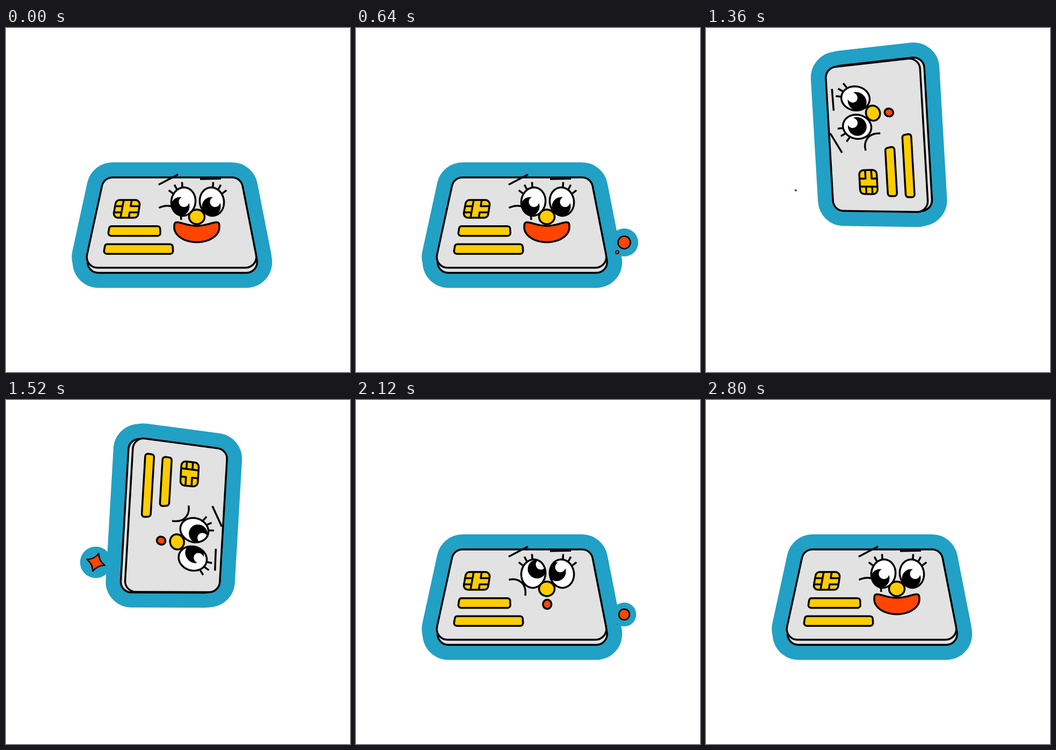
An HTML page with a canvas that plays this animation: 640 px wide and 640 px high, repeating every 2920 ms.

```html
<!DOCTYPE html>
<html lang="en">
<head>
<meta charset="utf-8">
<title>Jumping card</title>
<style>
html, body { margin: 0; width: 100%; height: 100%; overflow: hidden; background: #fff; }
canvas { display: block; width: 640px; height: 640px; }
</style>
</head>
<body>
<canvas id="stage" width="640" height="640"></canvas>
<script>
const g = document.getElementById('stage').getContext('2d');
const LOOP = 2920, STEP = 40, LAST = 2800, RAD = Math.PI / 180;
const BLUE = '#21a1c5', GREY = '#e2e2e2', YELLOW = '#ffcc00', RED = '#ff4500';

const mix = (a, b, p) => a + (b - a) * p;
const part = (t, a, b) => Math.min(1, Math.max(0, (t - a) / (b - a)));
const ease = (t, a, b) => { const p = part(t, a, b); return p * p * (3 - 2 * p); };
const pulse = (t, a, b, c) => ease(t, a, b) - ease(t, b, c);

// The lying card: a trapezoid around (CX, CY)
const CX = 308.6, CY = 362, TOP = 255, BOTTOM = 324.5, HEIGHT = 168;
let pose, anchor, shift = [0, 0];

function setPose(t) {
  const hop = pulse(t, 0, 240, 580);
  const p = part(t, 1160, 1680), leap = 4 * p * (1 - p);
  const turn = (-31.6 * hop - 360 * ease(t, 1200, 1680)) * RAD;
  const flat = Math.min(1, 1.2 * hop + 2 * leap);
  pose = {
    x: CX - 37 * hop + 9.4 * leap,
    y: CY - 48.7 * hop - 168 * leap,
    c: Math.cos(turn), s: Math.sin(turn), flat,
    top: mix(TOP, 266, flat), bottom: mix(BOTTOM, 288.5, flat), height: mix(HEIGHT, 176, flat),
    squash: 1.25 * pulse(t, 720, 1160, 1220) + 1.3 * pulse(t, 1620, 1680, 1890) - 1.5 * pulse(t, 2260, 2440, 2660),
    look: ease(t, 1140, 1580) - ease(t, 2220, 2580),
    smile: 1 - ease(t, 860, 1220) + ease(t, 2240, 2600)
  };
}

const spin = (X, Y) => [X * pose.c - Y * pose.s, X * pose.s + Y * pose.c];

// Perspective position of a point of the lying card, with its row's scale
function project(x, y) {
  const k0 = TOP / BOTTOM, v0 = (y - CY) / HEIGHT + .5, row = mix(TOP, BOTTOM, v0);
  const u = (x - CX - .9 + 1.8 * v0) / row, v = v0 / (k0 + (1 - k0) * v0);
  const k = pose.top / pose.bottom, w = v * k / (1 - (1 - k) * v);
  const width = mix(pose.top, pose.bottom, w);
  const [X, Y] = spin(u * width + .9 - 1.8 * w + shift[0], (w - .5) * pose.height + shift[1]);
  return { x: pose.x + X, y: pose.y + Y, u, scale: width / row };
}

// Parts keep their shape around an anchor and only lose their lean
function at(x, y) {
  if (!anchor) { const q = project(x, y); return [q.x, q.y]; }
  const q = project(...anchor), dx = x - anchor[0], dy = y - anchor[1];
  const [X, Y] = spin((dx - q.u * .4 * pose.flat * dy) * q.scale, dy * q.scale);
  return [q.x + X, q.y + Y];
}

function lines(...strokes) {
  const p = new Path2D();
  for (const s of strokes) s.forEach((q, i) => p[i ? 'lineTo' : 'moveTo'](...at(...q)));
  return p;
}

function ring(fn, n = 40) {
  const p = new Path2D();
  for (let i = 0; i < n; i++) {
    const a = i / n * 2 * Math.PI;
    p[i ? 'lineTo' : 'moveTo'](...at(...fn(Math.cos(a), Math.sin(a))));
  }
  p.closePath();
  return p;
}

const oval = (x, y, rx, ry = rx, tilt = 0) => ring((c, s) => [
  x + rx * c * Math.cos(tilt) - ry * s * Math.sin(tilt),
  y + rx * c * Math.sin(tilt) + ry * s * Math.cos(tilt)
]);

function roundQuad(corners, r) {
  const q = corners.map(c => at(...c)), p = new Path2D();
  p.moveTo((q[0][0] + q[3][0]) / 2, (q[0][1] + q[3][1]) / 2);
  q.forEach((c, i) => p.arcTo(...c, ...q[(i + 1) % 4], r));
  p.closePath();
  return p;
}

function paint(p, fill, line = 3.5) {
  if (fill) { g.fillStyle = fill; g.fill(p); }
  if (line) { g.strokeStyle = '#000'; g.lineWidth = line; g.stroke(p); }
}

const card = () => roundQuad([[182, 278], [437, 278], [470, 446], [145.5, 446]], 20);

function chip() {
  anchor = [225, 336.5];
  paint(roundQuad([[205, 320], [250, 320], [245, 353], [199, 353]], 8), YELLOW);
  paint(lines([[219, 320], [213, 353]],
    [[203, 331.5], [217, 331.5]], [[201, 343], [215, 343]],
    [[234, 320], [232, 331.5], [248, 331.5]], [[246.5, 343], [230, 343], [228.5, 353]]));
}

function bar(left, right, y) {
  anchor = [(left + right) / 2, y];
  paint(roundQuad([[left + 1.5, y - 9], [right - .5, y - 9], [right + .5, y + 9], [left - 1.5, y + 9]], 5), YELLOW);
}

function eye(x, side, px, py) {
  anchor = [x, 323];
  const white = oval(x, 323, 22.5, 26.5, -.16 * side);
  paint(white, '#fff', 0);
  g.save();
  g.clip(white);
  paint(oval(px, py, 17.5), '#000', 0);
  paint(oval(px + 7, py - 8.5, 9.5), '#fff', 0);
  g.restore();
  paint(white);
  for (let i = 0; i < 3; i++) {
    const a = side * (4 + 24 * i) * RAD;
    paint(lines([27 - i, 36.5 - i].map(r => [x + r * Math.sin(a), 323 - r * Math.cos(a)])));
  }
}

function brow(x, y, dx, dy) {
  anchor = [x, y];
  const drop = y + 7 * pose.flat;
  paint(lines([[x - dx, drop + dy], [x + dx, drop - dy]]));
}

function cheek(smile) {
  anchor = [300, 340];
  const p = new Path2D();
  p.moveTo(...at(284.5, 334.5));
  p.bezierCurveTo(...at(299, mix(331, 328, smile)), ...at(mix(318, 325, smile), mix(338, 328, smile)),
    ...at(mix(315, 326, smile), mix(364, 357, smile)));
  paint(p);
}

// Blends a small round mouth into a wide smile with a dipped upper lip
function mouth(smile) {
  anchor = [355, 380];
  paint(ring((c, s) => [
    mix(355.7 + 7.8 * c, 355 + 42 * c, smile),
    mix(380 + 8.5 * s, 371 + (s > 0 ? 27.5 * s : -(3 + 14 * c * c) * Math.sqrt(-s)), smile)
  ], 72), RED);
}

function face({ look, smile }) {
  eye(330, -1, mix(324, 337, look), mix(332, 314.5, look));
  eye(383, 1, mix(382, 373, look), mix(332, 319.5, look));
  brow(302, 282, 18, 9.5);
  brow(380.5, 280.7, 19.5, .4);
  cheek(smile);
  anchor = [355, 351.3];
  paint(oval(355, 351.3, 14.5, 13.5), YELLOW);
  mouth(smile);
}

// Each burst pops three dots, one after another
const burst = t0 => [
  { x: 514, y: 407, r: 6.8, halo: 23, start: t0, life: 380 },
  { x: 486, y: 417, r: 8, halo: 28, start: t0 + 70, life: 400 },
  { x: 499, y: 399, r: 12.5, halo: 28, start: t0 + 135, life: 460 }
];
const sparks = [220, 1660, 2180].flatMap(burst).concat(
  { x: 167, y: 302, r: 18, halo: 30, start: 1350, life: 400, star: true },
  { x: 182, y: 272, r: 31, halo: 45, start: 1680, life: 420, star: true }
);

function sparkShape({ x, y, r, star }, size) {
  const p = new Path2D();
  const polar = (a, d) => [x + d * size * Math.cos(a), y + d * size * Math.sin(a)];
  if (!star) { p.arc(x, y, r * size, 0, 7); return p; }
  p.moveTo(...polar(-1.25, r));
  for (let i = 1; i <= 4; i++) {
    const a = i * Math.PI / 2 - 1.25;
    p.quadraticCurveTo(...polar(a - Math.PI / 4, r * .36), ...polar(a, r));
  }
  p.closePath();
  return p;
}

function draw(t) {
  setPose(t);
  const live = sparks
    .map(o => [o, Math.sin(Math.PI * part(t, o.start, o.start + o.life))])
    .filter(([, size]) => size > .01);

  g.fillStyle = '#fff';
  g.fillRect(0, 0, 640, 640);
  g.lineJoin = 'round';
  g.fillStyle = BLUE;
  for (const [o, size] of live) {
    g.beginPath();
    g.arc(o.x, o.y, o.halo * size, 0, 7);
    g.fill();
  }

  g.save();
  g.translate(308, 446);
  g.scale(1 + .079 * pose.squash, 1 - .11 * pose.squash);
  g.translate(-308, -446);
  anchor = null;
  shift = [1.5, 9.5 - 1.5 * pose.flat];
  const slab = card();
  shift = [0, 0];
  const front = card();
  g.strokeStyle = g.fillStyle = BLUE;
  g.lineWidth = 56;
  for (const p of [slab, front]) { g.fill(p); g.stroke(p); }
  paint(slab, GREY);
  paint(front, GREY);
  chip();
  bar(191, 287, 377.7);
  bar(183, 310.5, 411.2);
  face(pose);
  g.restore();

  for (const [o, size] of live) paint(sparkShape(o, size), RED, Math.min(2.5, 4 * size));
}

function tick() {
  const t = performance.now() % LOOP;
  draw(Math.min(LAST, Math.floor(t / STEP) * STEP));
  requestAnimationFrame(tick);
}
tick();
</script>
</body>
</html>
```
